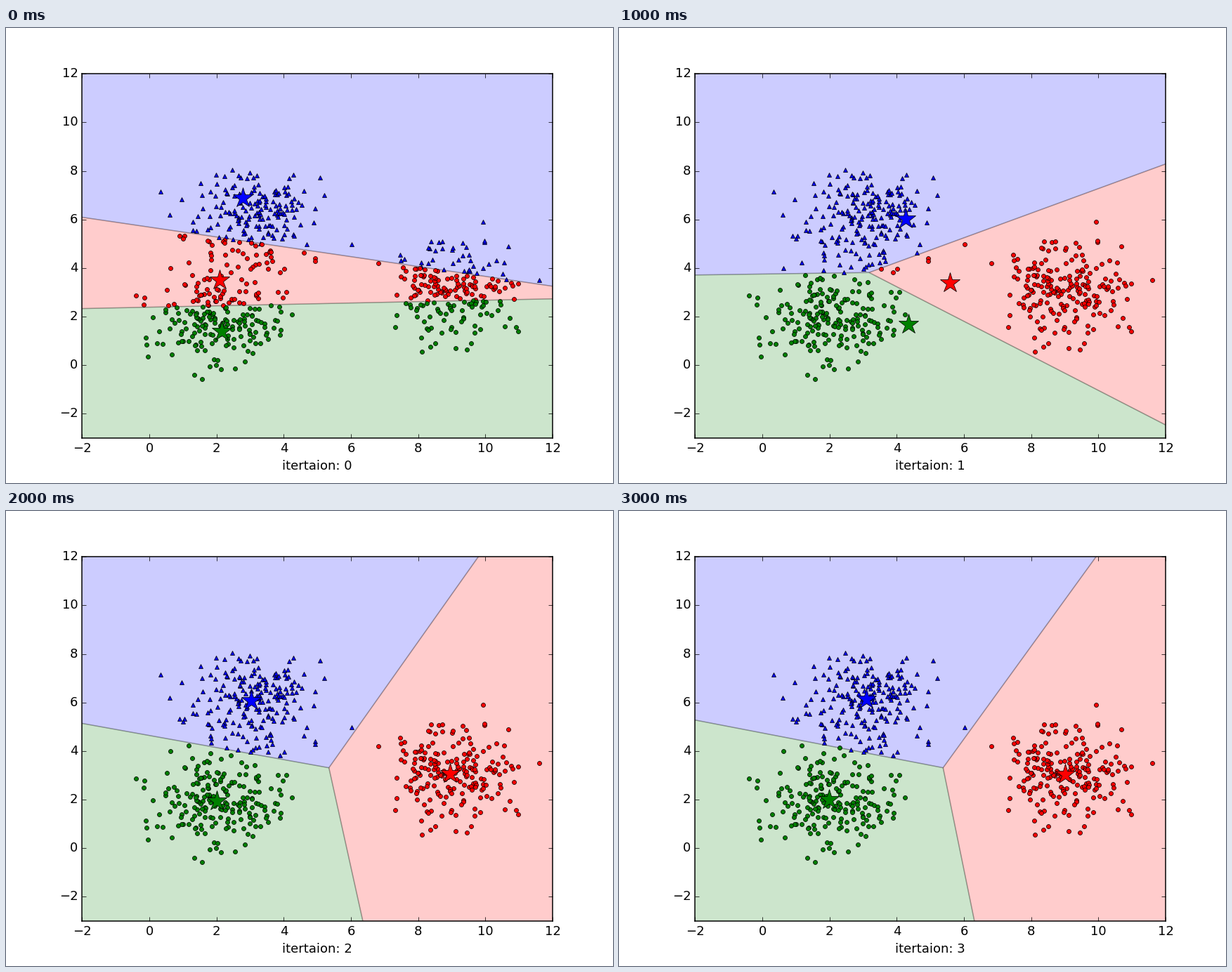
These frames come from a looping animation (864x648 px, 4 s). A matplotlib script:

```python
import numpy as np
import matplotlib.pyplot as plt
from matplotlib.animation import FuncAnimation
from matplotlib.patches import Polygon

plt.style.use("classic")
plt.rcParams.update({
    "font.family": "DejaVu Sans",
    "font.size": 12,
    "figure.dpi": 108,
    "savefig.dpi": "figure",
    "figure.facecolor": "white",
    "savefig.facecolor": "white",
})

WIDTH, HEIGHT, DPI = 864, 648, 108
COLORS = ("blue", "red", "green")
MARKERS = ("^", "o", "o")
CLUSTER_MEANS = [(3.08, 6.12), (9.0, 3.03), (2.0, 1.98)]
CLUSTER_SIZE = 200

# Centroids per iteration, in the order of COLORS.
CENTROIDS = np.array([
    [(2.78, 6.89), (2.09, 3.49), (2.15, 1.40)],
    [(4.27, 6.005), (5.59, 3.40), (4.356, 1.666)],
    [(3.03, 6.08), (8.945, 3.055), (2.00, 1.945)],
    [(3.09, 6.13), (9.00, 3.035), (1.99, 2.00)],
])

# The few points that stand clearly apart from their cluster.
STRAGGLERS = [(0.34, 7.15), (6.03, 4.98), (9.94, 5.89),
              (11.61, 3.51), (1.56, -0.58), (-0.08, 0.83)]


def make_cluster(rng, mean):
    """Normal cloud: evenly ranked radii at random angles, far tail cut off."""
    rank = (np.arange(CLUSTER_SIZE) + 0.5) / CLUSTER_SIZE
    radius = np.sqrt(-2 * np.log(1 - 0.97 * rank))
    angle = rng.uniform(0, 2 * np.pi, CLUSTER_SIZE)
    cloud = radius * np.array([np.cos(angle), np.sin(angle)])
    return mean + cloud.T


def clip_closer(polygon, a, b):
    """Part of the polygon that is nearer to a than to b."""
    normal, middle = b - a, (a + b) / 2
    result = []
    for p, q in zip(polygon, np.roll(polygon, -1, axis=0)):
        dp, dq = (p - middle) @ normal, (q - middle) @ normal
        if dp <= 0:
            result.append(p)
        if dp * dq < 0:
            result.append(p + (q - p) * dp / (dp - dq))
    return np.array(result)


def region(centers, k):
    polygon = np.array([(-30, -30), (40, -30), (40, 40), (-30, 40)], float)
    for j in range(len(centers)):
        if j != k:
            polygon = clip_closer(polygon, centers[k], centers[j])
    return polygon


rng = np.random.default_rng(11)
points = np.vstack([make_cluster(rng, mean) for mean in CLUSTER_MEANS]
                   + [STRAGGLERS])

fig = plt.figure(figsize=(WIDTH / DPI, HEIGHT / DPI), dpi=DPI)
ax = fig.add_axes([108.4 / WIDTH, 64.3 / HEIGHT, 0.775, 0.8])
ax.set_xlim(-2, 12)
ax.set_ylim(-3, 12)
ax.set_xticks(range(-2, 13, 2))
ax.set_yticks(range(-2, 13, 2))
label = ax.set_xlabel("itertaion: 0")

dots, stars, areas = [], [], []
for color, marker in zip(COLORS, MARKERS):
    style = dict(color=color, linestyle="none",
                 markeredgecolor="black", markeredgewidth=0.5)
    dots += ax.plot([], [], marker=marker, markersize=4, zorder=2, **style)
    stars += ax.plot([], [], marker="*", markersize=20, zorder=2.2, **style)
    areas.append(ax.add_patch(Polygon([(0, 0), (1, 0), (0, 1)], alpha=0.2,
                                      facecolor=color, edgecolor="black",
                                      linewidth=1)))


def update(step):
    centers = CENTROIDS[step]
    gaps = points[:, None, :] - centers[None, :, :]
    nearest = np.argmin((gaps ** 2).sum(axis=2), axis=1)
    for k, center in enumerate(centers):
        dots[k].set_data(*points[nearest == k].T)
        stars[k].set_data([center[0]], [center[1]])
        areas[k].set_xy(region(centers, k))
    label.set_text(f"itertaion: {step}")
    return [*dots, *stars, *areas, label]


anim = FuncAnimation(fig, update, frames=len(CENTROIDS), interval=1000,
                     init_func=lambda: update(0), repeat=True, repeat_delay=0)
plt.show()
```
